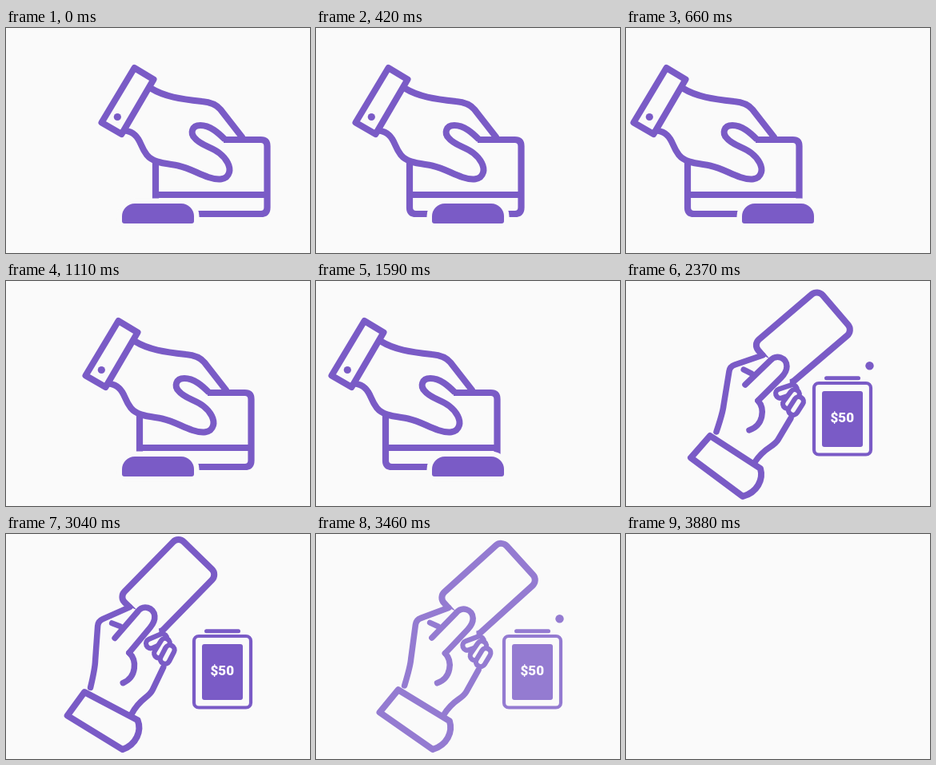
Recreate the animation shown at these times as an HTML page with a canvas. Size 380x282 px, loop 3940 ms.

```html
<!DOCTYPE html>
<html lang="en">
<head>
<meta charset="utf-8">
<title>Card payment</title>
<style>
  html, body { margin: 0; width: 100%; height: 100%; overflow: hidden; background: #fafafa; }
  canvas { display: block; width: 380px; height: 282px; }
</style>
</head>
<body>
<canvas id="stage" width="380" height="282"></canvas>
<script>
const W = 380, H = 282, LOOP = 3940, STEP = 30;
const INK = '#7a5bc6', PAPER = '#fafafa';
const stage = document.getElementById('stage').getContext('2d');
const layer = document.createElement('canvas');
layer.width = W;
layer.height = H;
const tapLayer = layer.getContext('2d');

const clamp = v => Math.max(0, Math.min(1, v));
const progress = (t, from, to) => clamp((t - from) / (to - from));

function clear(c) {
  c.fillStyle = PAPER;
  c.fillRect(0, 0, W, H);
}

function stroke(c, path, width = 8, color = INK) {
  c.lineWidth = width;
  c.strokeStyle = color;
  c.lineJoin = 'round';
  c.stroke(path);
}

function fill(c, path, color = INK) {
  c.fillStyle = color;
  c.fill(path);
}

function box(x, y, w, h, r) {
  const p = new Path2D();
  p.roundRect(x, y, w, h, r);
  return p;
}

function dot(c, x, y, r) {
  c.beginPath();
  c.arc(x, y, r, 0, Math.PI * 2);
  c.fillStyle = INK;
  c.fill();
}

// Swipe scene
const reader = box(145, 220, 90, 25, [16, 16, 3, 3]);
const swipeCard = new Path2D(
  'M187 166 V225 Q187 233 195 233 H318.5 Q326.5 233 326.5 225 V148 Q326.5 140 318.5 140 H272 M187 209 H326.5');
const swipeCuff = new Path2D('M160.5 50 L184.5 64.5 L144.5 133 L119.5 118.5 Z');
const swipeHand = new Path2D(
  'M181 75.5 C198 86 218 89 245 92 C257 93 263 96 268 102 L296 138 ' +
  'M274 140 C265 131 255 122 243 122 C232 122 230 132 236 138 ' +
  'C243 147 257 149 267 157 C276 164 281 174 279 181 ' +
  'C276 191 265 191 253 187 C239 182 230 176 215 172.5 ' +
  'C199 169.5 184 169 176 159 C168 149 169 141 161 134 C157 130 152 129 148 128.5');

function drawSwipe(c, t) {
  const pass = t < 990 ? t : t - 990;
  clear(c);
  c.save();
  c.translate(-Math.min(pass, 660) / 6, 0);
  c.lineCap = 'butt';
  stroke(c, swipeCard, 8.2);
  stroke(c, swipeHand);
  stroke(c, swipeCuff);
  dot(c, 139.3, 111.5, 4.6);
  c.restore();
  stroke(c, reader, 13, PAPER);
  fill(c, reader);
}

// Tap scene
const tapCard = box(-9.5, -9.5, 106, 68, 9.5);
const palm = new Path2D(
  'M113 189 L122 158 L130 112 Q131 107 136 105 L171 93 ' +
  'L204 110 L207 172 L188 203 L160 226 Z');
const palmLines = new Path2D(
  'M113 189 C119 171 121 165 122 156 L129 113 Q130 107 136 105 L171 93 ' +
  'M206 172 L190 199 C184 209 174 207 161 227');
const thumb = new Path2D(
  'M149 130 L180 100 C188 91 201 96 201 107 C201 113 198 117 194 121 L165 150');
const thumbCrease = new Path2D('M147 111 L157 116');
const crease = new Path2D('M165 150 C174 160 172 181 154 187');
const tapCuff = new Path2D(
  'M105 194 L168 235 C172 249 164 265 146 270 L81 221.5 Z');
const fingers = ['M193 141 L208 136', 'M202 154 L211 142', 'M209 162 L216 151']
  .map(d => new Path2D(d));

function drawHand(c) {
  c.save();
  c.translate(172.4, 80.4);
  c.rotate(-40.5 * Math.PI / 180);
  stroke(c, tapCard);
  c.restore();
  fill(c, palm, PAPER);
  c.lineCap = 'round';
  for (const finger of fingers) {
    stroke(c, finger, 18);
    stroke(c, finger, 5.5, PAPER);
  }
  stroke(c, palmLines, 7.5);
  fill(c, thumb, PAPER);
  stroke(c, thumb, 7.5);
  stroke(c, thumbCrease, 7);
  stroke(c, crease, 7.5);
  fill(c, tapCuff, PAPER);
  stroke(c, tapCuff);
}

function drawTerminal(c) {
  fill(c, box(248, 119.3, 45, 5, 2.5));
  stroke(c, box(235, 128, 71, 89.5, 6), 4.2);
  fill(c, box(245, 138, 51, 70, 3));
  c.fillStyle = '#fff';
  c.font = '900 17px Roboto, Arial, sans-serif';
  c.textAlign = 'center';
  c.textBaseline = 'alphabetic';
  c.fillText('$50', 270.3, 177.3);
}

function signalArc(c, radius) {
  const arc = new Path2D();
  arc.arc(304.5, 113, radius, -Math.PI * 0.75, -Math.PI * 0.25);
  stroke(c, arc, 5);
}

function drawTap(c, t) {
  const phase = t < 1930 ? 0 : (t - 1930) % 990;
  const swing = (1 - Math.cos(2 * Math.PI * progress(phase, 0, 780))) / 2;
  clear(c);
  drawTerminal(c);
  c.save();
  c.translate(147, 272);
  c.rotate((6.7 * swing - 6.44) * Math.PI / 180);
  c.translate(-147, -272);
  drawHand(c);
  c.restore();
  if (phase >= 410) dot(c, 304.5, 106.3, 5.2);
  if (phase >= 595) signalArc(c, 21);
  if (phase >= 780) signalArc(c, 34);
}

function draw(t) {
  const reveal = progress(t, 1620, 2010);
  const fade = 1 - (1 - progress(t, 3400, 3870)) ** 2;
  if (reveal < 1) drawSwipe(stage, t);
  if (reveal > 0) {
    drawTap(tapLayer, t);
    stage.globalAlpha = reveal;
    stage.drawImage(layer, 0, 0);
    stage.globalAlpha = fade;
    clear(stage);
    stage.globalAlpha = 1;
  }
}

const start = performance.now();
function tick() {
  const t = (performance.now() - start) % LOOP;
  draw(Math.floor(t / STEP) * STEP);
  requestAnimationFrame(tick);
}
tick();
</script>
</body>
</html>
```
